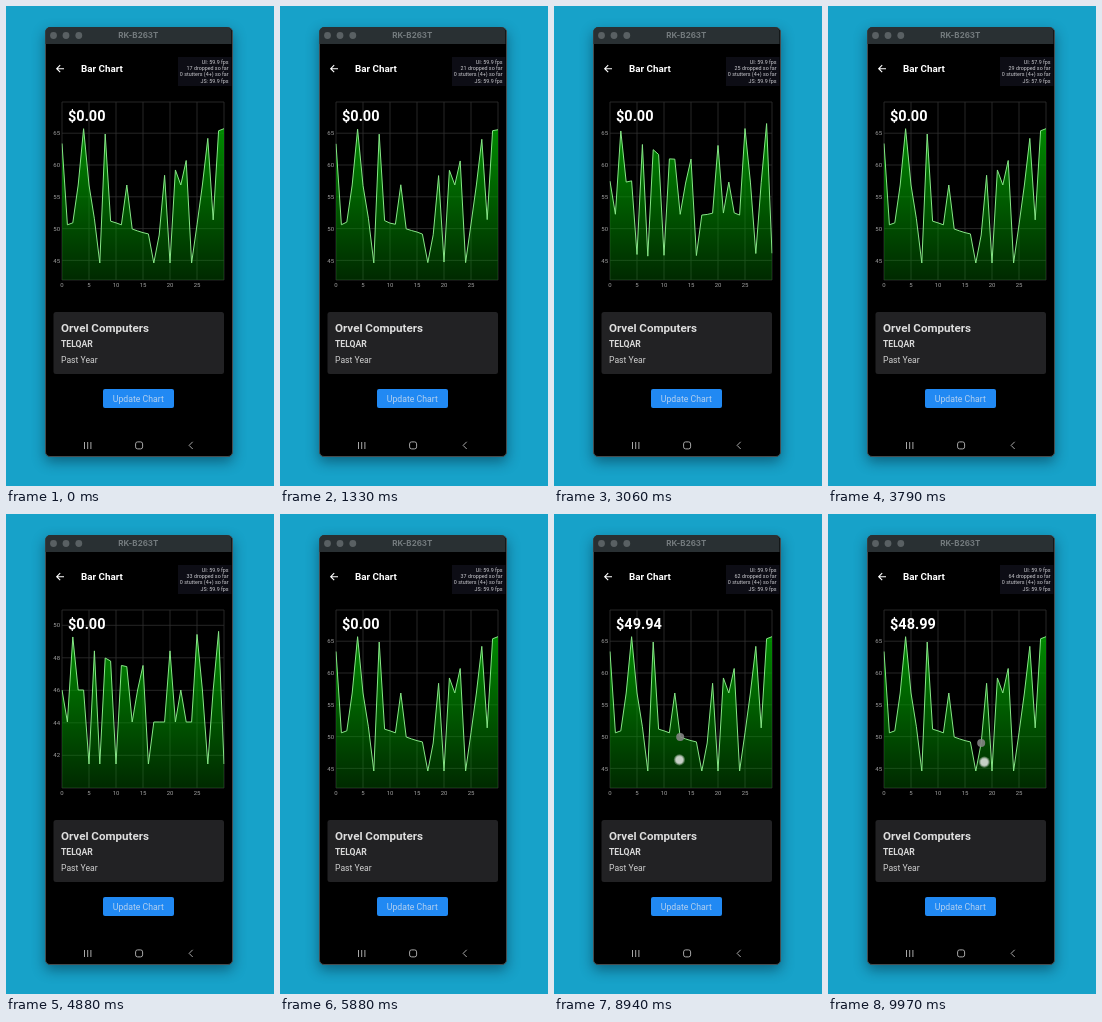
An HTML page that plays this animation: 268 by 480 pixels, repeating every 10000 ms.

```html
<!DOCTYPE html>
<html lang="en">
<head>
<meta charset="utf-8">
<title>Area chart demo</title>
<style>
  html, body { margin: 0; width: 100%; height: 100%; overflow: hidden; background: #17a2c9; }
  .stage { position: relative; width: 268px; height: 480px; overflow: hidden; }
  .window {
    position: absolute; left: 38.5px; top: 20.5px; width: 188px; height: 430px;
    box-sizing: border-box; border: 1px solid #454c4f; border-radius: 5px; background: #000;
    box-shadow: 0 5px 13px rgba(0, 25, 40, .45);
  }
  svg { position: absolute; left: 0; top: 0; display: block; }
  text { font-family: Roboto, sans-serif; fill: #fff; }
  .bold { font-weight: 700; }
  .title { font: 700 8px Inter, sans-serif; fill: #747b7e; text-anchor: middle; }
  .axis text { font-size: 6px; fill: #a2a2a2; text-anchor: middle; }
  .grid { stroke: #303030; stroke-width: .8; fill: none; }
  .perf text { font-size: 5.35px; fill: #cdcdd2; text-anchor: end; }
  .nav { stroke: #a8a8a8; fill: none; }
</style>
</head>
<body>
<div class="stage">
  <div class="window"></div>
  <svg width="268" height="480" viewBox="0 0 268 480">
    <defs>
      <linearGradient id="fade" gradientUnits="userSpaceOnUse" x1="0" y1="96" x2="0" y2="274">
        <stop offset="0" stop-color="#009a00"/>
        <stop offset="1" stop-color="#009a00" stop-opacity=".27"/>
      </linearGradient>
      <clipPath id="plot"><rect x="55.5" y="96" width="163" height="178"/></clipPath>
    </defs>

    <path d="M39.5 38V26a5 5 0 0 1 5-5H220.500a5 5 0 0 1 5 5V38Z" fill="#293033"/>
    <g fill="#596063">
      <circle cx="47.5" cy="29.5" r="3.4"/>
      <circle cx="60" cy="29.5" r="3.4"/>
      <circle cx="72.8" cy="29.5" r="3.4"/>
    </g>
    <text class="title" x="132.3" y="32.2">RK-B263T</text>

    <path d="M58 62.7H51M54.2 59.2L50.7 62.7L54.2 66.2" stroke="#fff" stroke-width="1.1" fill="none"/>
    <text class="bold" x="75" y="66.4" font-size="9.8">Bar Chart</text>

    <rect x="172" y="51" width="53.5" height="29" fill="#0d0d15"/>
    <g class="perf">
      <text id="ui" x="222.6" y="57.8"></text>
      <text id="drops" x="222.6" y="64.1"></text>
      <text x="222.6" y="70.4">0 stutters (4+) so far</text>
      <text id="js" x="222.6" y="76.7"></text>
    </g>

    <path id="grid" class="grid"/>
    <g id="xAxis" class="axis"></g>
    <g id="yAxis" class="axis"></g>
    <g clip-path="url(#plot)">
      <path id="area" fill="url(#fade)"/>
      <path id="line" fill="none" stroke="#86e686" stroke-linejoin="round"/>
    </g>
    <text id="price" class="bold" x="62" y="115" font-size="14.5"></text>
    <g id="cursor">
      <circle id="marker" r="4" fill="#858585" fill-opacity=".88"/>
      <g id="finger">
        <circle r="5.6" fill="#fff" fill-opacity=".28"/>
        <circle r="4.6" fill="#ddd" fill-opacity=".55"/>
        <circle r="3.6" fill="#d5dbd5" fill-opacity=".75"/>
      </g>
    </g>

    <rect x="47.5" y="306" width="170.5" height="62" rx="2.5" fill="#222224"/>
    <text class="bold" x="55" y="326" font-size="11.6" style="fill:#dedede">Orvel Computers</text>
    <text class="bold" x="55" y="341.2" font-size="8.6" style="fill:#d8d8d8">TELQAR</text>
    <text x="55" y="356.7" font-size="8.65" style="fill:#cfcfcf">Past Year</text>

    <rect x="97" y="383" width="71" height="19" rx="2" fill="#2189f3"/>
    <text x="132.3" y="395.8" font-size="8.7" text-anchor="middle" style="fill:#b4d0ef">Update Chart</text>

    <path class="nav" d="M78.500 436V443M81.7 436V443M84.9 436V443M186.7 435.8L183.1 439.4L186.7 443"/>
    <rect class="nav" x="129.6" y="435.9" width="7" height="7" rx="2"/>
  </svg>
</div>
<script>
const LOOP = 10000, COUNT = 31, LEFT = 56, RIGHT = 218, TOP = 96, BOTTOM = 274;
const STEP = (RIGHT - LEFT) / (COUNT - 1);
const TAP_START = 60, TAP_GAP = 990, TAPS = 6, MORPH = 300;
const TOUCH = 6600, PERF_GAP = 1100;

const $ = id => document.getElementById(id);
const px = i => LEFT + i * STEP;
const easeInOut = t => t < .5 ? 2 * t * t : 1 - 2 * (1 - t) ** 2;
const wave = (i, mid, amp, crest, period) => mid + amp * Math.cos((i - crest) / period * 2 * Math.PI);
const label = (x, y, s) => `<text x="${x}" y="${y + 2.1}">${s}</text>`;

// Heights run along a base line, broken by peaks, shoulders and dips.
function makeSeries({ peaks, shoulders, dips, peak, shoulder, dip, base }) {
  return Array.from({ length: COUNT }, (_, i) =>
    peaks.includes(i) ? peak(i) : shoulders.includes(i) ? shoulder : dips.includes(i) ? dip : base(i));
}

const wide = {
  first: 65, unit: 5, top: 127.2, gap: 31.8,
  ys: makeSeries({
    peaks: [0, 4, 8, 19, 21, 23, 27, 29, 30], peak: i => wave(i, 146, 24, 18, 26),
    shoulders: [3, 5, 12, 22, 26], shoulder: 179,
    dips: [7, 17, 20, 24], dip: 257,
    base: i => wave(i, 220.9, 8.1, 18, 24)
  })
};
const narrow = {
  first: 50, unit: 2, top: 111.3, gap: 32.5,
  ys: makeSeries({
    peaks: [2, 6, 8, 9, 11, 12, 15, 20, 25, 29], peak: i => wave(i, 135, 18, 13, 30),
    shoulders: [0, 3, 4, 14, 22, 26, 28], shoulder: 176,
    dips: [5, 7, 10, 16, 27, 30], dip: 250,
    base: () => 208
  })
};

$('xAxis').innerHTML = [0, 5, 10, 15, 20, 25].map(i => label(px(i), 278.7, i)).join('');

let shown;
function drawScale(series) {
  if (series === shown) return;
  shown = series;
  const { first, unit, top, gap } = series;
  let d = `M${LEFT} ${TOP}H${RIGHT}V${BOTTOM}H${LEFT}`, marks = '';
  for (let i = 0; i < COUNT - 1; i += 5) d += `M${px(i)} ${TOP}V${BOTTOM}`;
  for (let k = 0; k < 5; k++) {
    const y = top + k * gap;
    d += `M${LEFT} ${y}H${RIGHT}`;
    marks += label(50.7, y, first - k * unit);
  }
  $('grid').setAttribute('d', d);
  $('yAxis').innerHTML = marks;
}

function drawChart(t) {
  const taps = Math.max(0, Math.min(TAPS, Math.floor((t - TAP_START) / TAP_GAP) + 1));
  const since = t - TAP_START - (taps - 1) * TAP_GAP;
  const p = taps ? easeInOut(Math.min(1, since / MORPH)) : 1;
  const [from, to] = taps % 2 ? [wide, narrow] : [narrow, wide];
  const points = to.ys.map((y, i) =>
    `${px(i).toFixed(2)} ${(from.ys[i] + (y - from.ys[i]) * p).toFixed(2)}`);
  const d = 'M' + points.join('L');
  drawScale(to);
  $('line').setAttribute('d', d);
  $('area').setAttribute('d', `${d}V${BOTTOM}H${LEFT}Z`);
}

function drawCursor(t) {
  const held = t - TOUCH;
  $('cursor').style.display = held >= 0 ? '' : 'none';
  let price = 0;
  if (held >= 0) {
    const x = 55.2 + held * .03, y = 240.7 + held * .0022;
    const i = Math.max(0, Math.round((x - 1 - LEFT) / STEP));
    const { ys, first, unit, top, gap } = wide;
    price = first - (ys[i] - top) / gap * unit;
    $('marker').setAttribute('transform', `translate(${px(i)} ${ys[i]})`);
    $('finger').setAttribute('transform', `translate(${x} ${y})`);
  }
  $('price').textContent = '$' + price.toFixed(2);
}

function drawPerf(t) {
  const n = Math.floor(t / PERF_GAP);
  const drops = t < TOUCH ? 17 + 4 * n : 49 + Math.floor(n * 5 / 3);
  const slow = { 3: 2, 6: 20 }[n] || 0;
  const fps = (59.9 - slow).toFixed(1);
  $('ui').textContent = `UI: ${fps} fps`;
  $('drops').textContent = `${drops} dropped so far`;
  $('js').textContent = `JS: ${fps} fps`;
}

function frame() {
  const t = performance.now() % LOOP;
  drawChart(t);
  drawCursor(t);
  drawPerf(t);
  requestAnimationFrame(frame);
}
frame();
</script>
</body>
</html>
```
